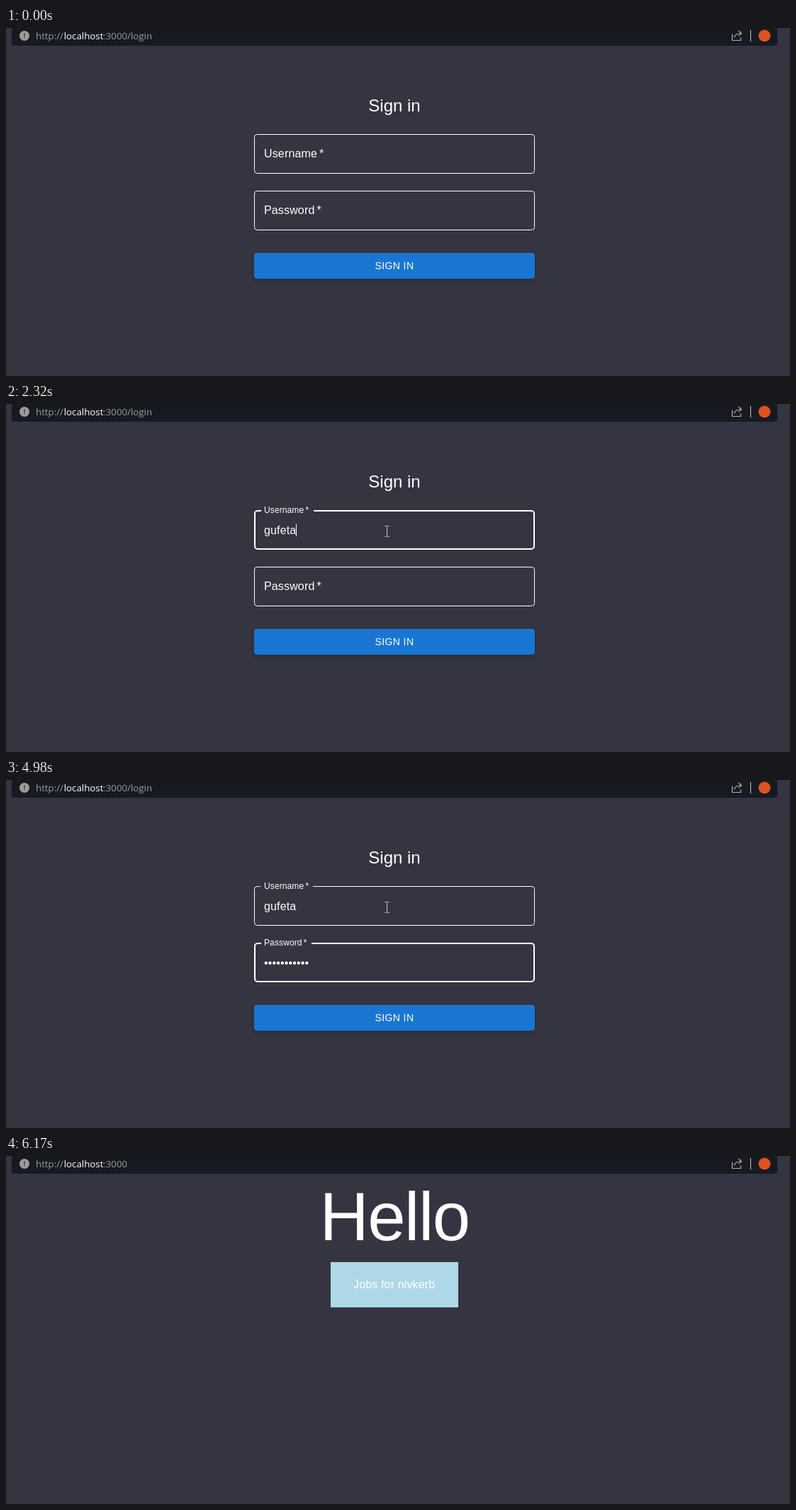
An HTML page that plays this animation: 1106x492 px, repeating every 8630 ms.

```html
<!DOCTYPE html>
<html lang="en">
<head>
<meta charset="utf-8">
<title>Sign in</title>
<style>
  html, body { margin: 0; width: 100%; height: 100%; overflow: hidden; background: #343541; }
  svg { display: block; }
  text { font: 16px "Liberation Sans", Arial, sans-serif; letter-spacing: .15px; fill: #fff; white-space: pre; }
  #url { font: 13.3px "Open Sans", sans-serif; letter-spacing: 0; fill: #999ba0; }
  #button { fill: #1976d2; filter: drop-shadow(0 2px 2px rgba(0, 0, 0, .28)); }
  .outline { fill: none; stroke: #fff; }
  .notch { fill: #343541; }
  .caret { fill: #fff; }
</style>
</head>
<body>
<svg width="1106" height="492" viewBox="0 0 1106 492">
  <rect width="1106" height="492" fill="#343541"/>
  <rect width="1106" height="29" fill="#333543"/>
  <rect x="8" y="-10" width="1080" height="35" rx="4" fill="#171a21"/>
  <circle cx="26" cy="11" r="7" fill="#a09d9a"/>
  <path d="M26 7.5v4.5M26 13v1.5" stroke="#33343a" stroke-width="1.5"/>
  <text id="url" y="16"><tspan x="42">http://</tspan><tspan x="81.7" fill="#fff">localhost</tspan><tspan x="137.2">:3000</tspan><tspan x="171" id="path">/login</tspan></text>
  <path d="M1024.5 8.500v9h12v-4M1027.500 13.500q1-6 9-6M1033.500 4l4 3.500l-4 3.500" fill="none" stroke="#b4b2ab" stroke-width="1.200"/>
  <path d="M1050.500 3v16" stroke="#c5c3bd"/>
  <circle cx="1070" cy="11" r="8.500" fill="#dd5220"/>

  <g id="login">
    <text x="511.300" y="118" style="font-size:24px;letter-spacing:0">Sign in</text>
    <g id="fields"></g>
    <rect id="button" x="350" y="318" width="396" height="36.500" rx="4"/>
    <text x="520.500" y="341" style="font-size:14px;letter-spacing:.4px">SIGN IN</text>
  </g>

  <g id="home">
    <text x="442.400" y="119" style="font-size:96px;letter-spacing:-1.500px">Hello</text>
    <rect x="458" y="150" width="180" height="64" fill="#add8e6"/>
    <text x="490" y="187">Jobs for nivkerb</text>
  </g>

  <g id="pointer">
    <path id="arrow" d="M.5 .5V16.500L4.200 13L6.700 18.700L9.200 17.600L6.800 12.200H12Z" fill="#fff" stroke="#111" stroke-width=".9"/>
    <path id="beam" d="M-3 -7.500h2.500M.5 -7.500h2.500M-3 7.500h2.500M.5 7.500h2.500M0 -7v14" fill="none" stroke="#cbcabe"/>
  </g>
</svg>
<script>
const LOOP = 8630, TICK = 66.4, BLINK = 530;
const $ = id => document.getElementById(id);
const clamp = x => Math.min(1, Math.max(0, x));
const easeOut = x => 1 - (1 - clamp(x)) ** 3;
const show = (el, on) => { el.style.display = on ? '' : 'none'; };

function makeField(label, top, gap, focus, blur, value, keys) {
  const g = document.createElementNS($('fields').namespaceURI, 'g');
  g.innerHTML = `<rect class="outline" rx="4"/><rect class="notch" y="${top - 1}" height="4"/>
    <text class="label">${label}<tspan dx="3">*</tspan></text>
    <text class="value" x="364" y="${top + 34}"></text>
    <rect class="caret" y="${top + 20}" width="1" height="17"/>`;
  $('fields').append(g);
  const [outline, notch, caption, input, caret] = g.children;
  const set = (el, attrs) => { for (const k in attrs) el.setAttribute(k, attrs[k]); };

  return (t, frameTime) => {
    const focused = t >= focus && t < blur;
    const line = focused ? 2 : 1;
    const age = t >= focus ? frameTime - focus + 22 : 0;
    const lift = easeOut(age / 200);
    set(outline, {
      x: 350 + line / 2, y: top + line / 2,
      width: 396 - line, height: 56 - line, 'stroke-width': line
    });
    set(notch, { x: 358 + line, width: gap * easeOut((age - 50) / 100) });
    set(caption, { transform: `translate(364 ${top + 33 - 29 * lift}) scale(${1 - lift / 4})` });

    const typed = keys.filter(k => k <= t);
    input.textContent = value.slice(0, typed.length);
    const width = typed.length ? input.getComputedTextLength() : 0;
    const last = typed.length ? typed[typed.length - 1] : focus;
    set(caret, { x: Math.floor(364 + width) });
    show(caret, focused && (t - last) % (2 * BLINK) < BLINK);
  };
}

const fields = [
  makeField('Username', 150, 74, 590, 2590, 'gufeta', [1460, 1590, 1790, 2050, 2260, 2320]),
  makeField('Password', 230, 71, 2590, 5180, '•'.repeat(11),
    [2990, 3120, 3250, 3320, 3520, 3650, 3780, 3980, 4180, 4250, 4450])
];

const exitPath = [[536, 190], [533, 213], [546, 264], [582, 311], [631, 348]];

function pointerAt(t, frameTime) {
  if (t >= 5840) return exitPath[Math.min(4, Math.round((frameTime - 5843) / TICK))];
  if (t >= 5180) return [535, 179];
  const p = easeOut((frameTime - TICK) / (5 * TICK));
  return [984 - 446.5 * p, 419 - 239 * p];
}

function draw(t) {
  const frameTime = Math.floor((t + 10) / TICK) * TICK;
  const signedIn = t >= 5180;
  show($('path'), !signedIn);
  show($('login'), !signedIn);
  show($('home'), t >= 5510);
  fields.forEach(update => update(t, frameTime));

  const [x, y] = pointerAt(t, frameTime);
  const overField = !signedIn && x > 350 && x < 746 && (y > 150 && y < 206 || y > 230 && y < 286);
  $('pointer').setAttribute('transform', `translate(${x} ${y})`);
  show($('pointer'), t >= 70 && t < 6170);
  show($('arrow'), !overField);
  show($('beam'), overField);
}

const start = performance.now();
function tick() {
  draw((performance.now() - start) % LOOP);
  requestAnimationFrame(tick);
}
tick();
</script>
</body>
</html>
```
